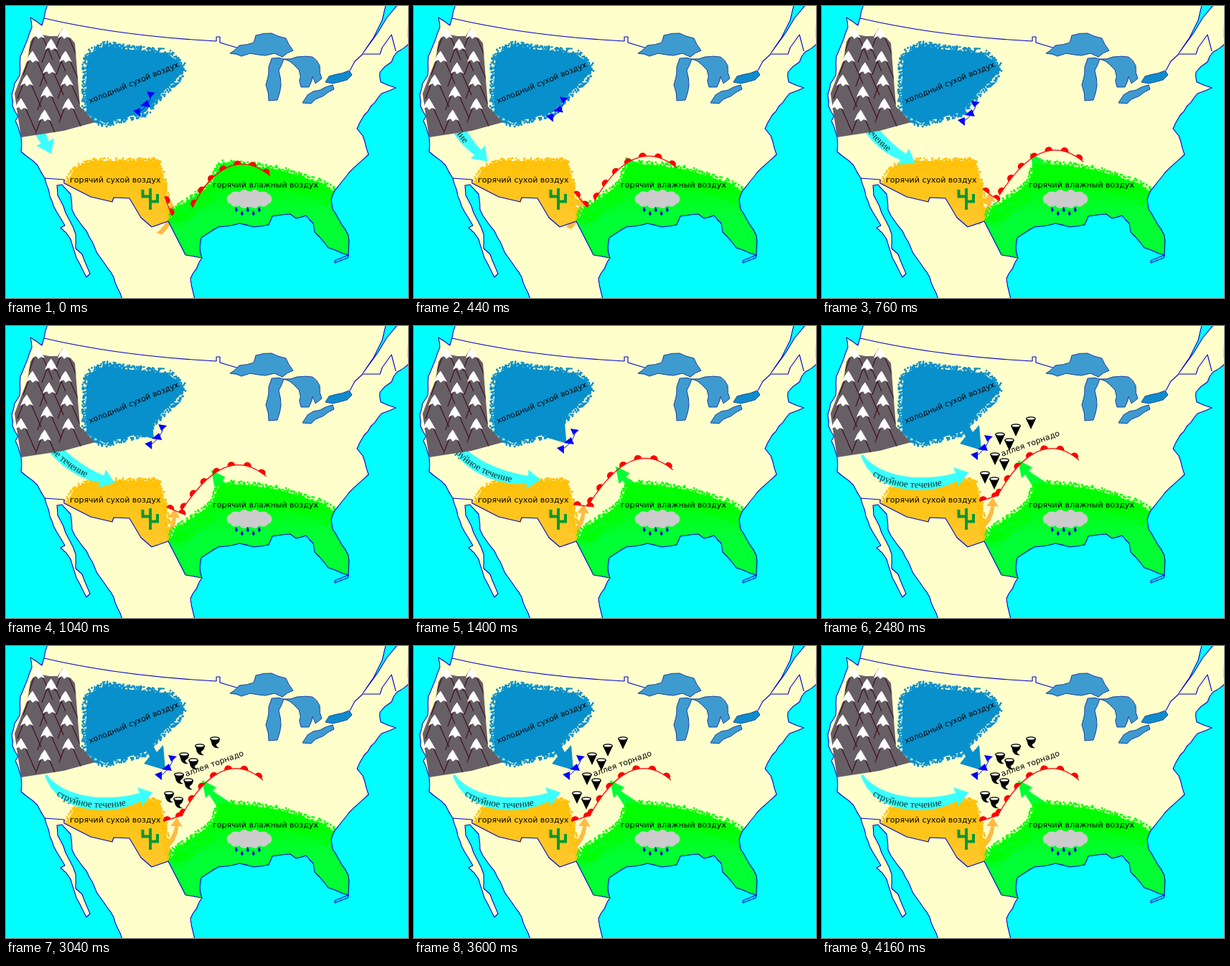
An HTML page for the animation above (4200 ms loop, 560 by 407 pixels).

```html
<!DOCTYPE html>
<html lang="ru">
<head>
<meta charset="utf-8">
<style>
html, body { margin: 0; width: 100%; height: 100%; overflow: hidden; background: #0ff; }
svg { display: block; width: 560px; height: 407px; }
text { font: 11px "DejaVu Sans", sans-serif; }
.line { fill: none; stroke: #00c; stroke-width: 1.1; stroke-linejoin: round; }
.lake { fill: #3e9bd0; stroke: #13439f; stroke-linejoin: round; }
.fuzz { fill: none; stroke-linecap: round; stroke-width: 2.8; }
</style>
</head>
<body>
<svg viewBox="0 0 560 407">
  <defs>
    <path id="flow" d="M70 208C95 225 135 231 176 220"/>
    <path id="coast"/>
    <path id="rock" d="M21 183L80 174 124 162 103 140 96 52 79 31 72 42 60 42 41 38 34 50 30 75 12 122Z"/>
    <clipPath id="onLand"><use href="#coast"/></clipPath>
    <clipPath id="onRock"><use href="#rock"/></clipPath>
    <linearGradient id="wet" gradientUnits="userSpaceOnUse" x1="350" y1="240" x2="350" y2="290">
      <stop stop-color="#0f0"/><stop offset="1" stop-color="#0f3"/>
    </linearGradient>
    <linearGradient id="dry" x2="0" y2="1">
      <stop stop-color="#ffc20a"/><stop offset="1" stop-color="#ffc82e"/>
    </linearGradient>
  </defs>

  <use href="#coast" fill="#ffc"/>
  <path class="line" style="fill:#0ff" d="M497 66L512 44 524 20 529 -1H545L530 17 518 37Z"/>
  <path class="line" d="M53 17Q160 42 293 49V43H298V51L328 60M479 90L486 77 497 67H521L524 58 537 40 543 63M477 347L458 355V358L476 351Z"/>
  <g id="lakes"></g>

  <g clip-path="url(#onLand)">
    <path id="coldArrow" fill="#0890cc" d="M185 127L195 121 210 148 219 138 222 173 192 164 200 154Z"/>
    <path id="wetArrow" fill="#0f3" d="M273 187L293 197 288 202 312 218 318 232 299 232 283 207 278 212Z"/>
    <path id="dryArrow" fill="#fb4" d="M238 239L246 252 240 251Q240 269 224 284L217 281Q233 268 235 251L229 251Z"/>
    <g id="air"></g>
  </g>
  <use href="#coast" class="line"/>
  <path id="border" class="line"/>

  <g id="jet">
    <path fill="#3cffff" d="M57 179C70 199 105 212 140 211Q164 211 186 205L183 197 204 204 190 223 188 216C170 226 145 231 120 228 85 224 64 207 54 181Z"/>
    <text style="font:13.5px 'Liberation Serif',serif" fill="#033"><textPath href="#flow">струйное течение</textPath></text>
  </g>

  <use href="#rock" fill="#665f66"/>
  <path id="ridges" clip-path="url(#onRock)" fill="none" stroke="#400c14" stroke-width="1.1"/>
  <path id="snow" fill="#fff"/>

  <path fill="none" stroke="#093" stroke-width="4" d="M190.500 256V265.500H201V254 284M211 262V272.500H201"/>
  <g id="cloud" fill="#ccc"></g>
  <path id="drops" fill="#00c"/>

  <text x="89" y="246">горячий сухой воздух</text>
  <text x="288" y="253">горячий влажный воздух</text>
  <text style="font-size:10.800px" transform="translate(117 136) rotate(-22.500)">холодный сухой воздух</text>

  <g id="coldFront">
    <path fill="none" stroke="#00f" d="M211 182Q229 176 234 153"/>
    <path fill="#00f" d="M207 179L217 175V187ZM217 172L227 164 231 174ZM226 152L238 154 230 161Z"/>
  </g>
  <g fill="none" stroke="#f00" stroke-width="1.2">
    <path id="dryFront"/>
    <path id="wetFront"/>
  </g>
  <path id="domes" fill="#f00"/>
  <g id="storms"></g>
  <text id="alley" transform="translate(251 182) rotate(-20)">аллея торнадо</text>
</svg>
<script>
const LOOP = 4200, STEP = 40, MOVE = 1920;
const $ = id => document.getElementById(id);
const put = (id, name, value) => $(id).setAttribute(name, value);
const clamp = v => Math.max(0, Math.min(1, v));
const mix = (a, b, p) => a + (b - a) * p;
const range = n => [...Array(n).keys()];
const points = s => s.split(" ").map(p => p.split(",").map(Number));
const outline = pts => "M" + pts.join("L");

let seed = 7;
function rand() {
  seed = (seed * 16807) % 2147483647;
  return seed / 2147483647;
}

// Break straight runs into short, slightly uneven pieces.
function rough(pts, amp) {
  return pts.flatMap(([x, y], i) => {
    const [u, v] = pts[(i + 1) % pts.length];
    const n = Math.max(1, Math.round(Math.hypot(u - x, v - y) / 9));
    const wobble = k => k ? (rand() - .5) * 2 * amp : 0;
    return range(n).map(k => [mix(x, u, k / n) + wobble(k), mix(y, v, k / n) + wobble(k)]);
  });
}

const west = points("58,-2 53,17 50,27 34,16 36,30 20,70 19,97 12,108 8,124 9,139 17,154 13,160 21,182 21,203 44,222 54,240");
const baja = points("61,265 70,286 82,306 76,309 90,325 98,351 112,378 117,373 106,346 97,338 97,318 72,264 71,250 78,249 90,262 92,284 116,322 131,350 150,378 162,409");
const gulf = points("263,409 257,380 273,351 270,335 272,323 296,308 325,303 345,308 366,305 371,293 396,290 404,296 418,292 428,303 430,315 449,337 477,347 477,320 455,283 453,270 458,257");
const east = points("478,232 505,207 497,181 489,171 499,152 508,140 523,122 543,114 522,106 521,92 537,78 545,64 561,53 561,-2");
put("coast", "d", outline(rough([...west, ...baja, ...gulf, ...east], 1)) + "Z");

const border = points("54,240 81,242 81,247 118,266 148,273 150,267 172,268 188,295 203,308 226,300 250,347 273,351");
put("border", "d", outline(border));

$("lakes").innerHTML = [
  "312,66 325,55 345,51 348,41 370,38 390,45 400,62 385,71 374,66 361,69 340,66 328,70",
  "370,73 387,74 380,90 383,111 378,131 366,132 362,110 366,85",
  "387,74 405,71 427,71 437,83 440,101 431,108 427,98 422,113 411,113 408,89 400,81",
  "413,135 420,124 455,110 457,116 441,126 425,136",
  "445,106 450,98 478,90 482,96 475,103 455,108"
].map(s => `<path class="lake" d="${outline(rough(points(s), 1.5))}Z"/>`).join("");
$("lakes").lastChild.style.fill = "#108ccc";

// A filled area whose edge is frayed by dots, from "inn" inside to "out" outside.
function region(edge, rest, fill, dots, out, inn, density) {
  let d = "";
  edge.slice(1).forEach(([bx, by], i) => {
    const [ax, ay] = edge[i], len = Math.hypot(bx - ax, by - ay);
    const nx = (by - ay) / len, ny = (ax - bx) / len;
    for (let k = 0; k < len * density; k++) {
      const u = rand(), off = mix(-inn, out, rand());
      d += `M${(mix(ax, bx, u) + nx * off).toFixed(1)} ${(mix(ay, by, u) + ny * off).toFixed(1)}h.01`;
    }
  });
  return `<path fill="${fill}" d="${outline([...edge, ...rest])}Z"/>
    <path class="fuzz" stroke="${dots}" d="${d}"/>`;
}
const dryEdge = points("83,246 100,223 120,216 213,216 222,255 229,300");
const wetEdge = points("229,301 234,285 285,250 299,220 330,221 380,228 440,247 458,259");
const coldEdge = points("116,66 140,55 165,60 225,66 246,84 241,98 212,126 194,148 137,163 112,150 112,84 116,66");
$("air").innerHTML =
  region(dryEdge, border.slice(2, 10).reverse(), "url(#dry)", "#ffc20a", 4, 4, 1.5) +
  region(wetEdge, [[490, 257], [490, 360], [275, 356], ...border.slice(9).reverse()],
    "url(#wet)", "#0f0", 5, 22, 4) +
  region(coldEdge, [], "#0890cc", "#0890cc", 6, 3, 1.8);

// Staggered peaks in three columns that spread towards the foot.
const peaks = range(12).map(i => {
  const row = Math.floor(i / 3), col = i % 3 - 1;
  return [63 - 3 * row + col * (18 + 5 * row), 29 + 33 * row + (col ? 0 : 16)];
});
put("snow", "d", peaks.map(([x, y]) => `M${x} ${y}l4 7 5 9-5-2-4 3-3-4-6 3 4-9z`).join(""));
put("ridges", "d", peaks.map(([x, y]) => `M${x} ${y}l-13 34M${x} ${y}l20 46`).join(""));

$("cloud").innerHTML = '<ellipse cx="339" cy="269" rx="28" ry="11"/>' + range(10).map(i => {
  const a = i * Math.PI / 5;
  return `<circle cx="${339 + 24 * Math.cos(a)}" cy="${269 + 6 * Math.sin(a)}" r="7.300"/>`;
}).join("");
put("drops", "d", range(5).map(i =>
  `M${320 + 8 * i} ${i % 2 ? 285 : 280}q4 4 2 6.500q-3 1-3-2z`).join(""));

const pairs = points("248,154 241,182 227,208").flatMap(([x, y]) => [[x, y], [x + 13, y + 8]]);
const swirl = "M-7-3C-4 3-5 5-3 7Q0 11 6 10Q1 8 2 5Q7 2 7-3Z";
const cone = "M-7-3H7L0 12Z";
$("storms").innerHTML = [...pairs, [270, 142], [291, 132]].map(([x, y]) =>
  `<g transform="translate(${x} ${y})"><path class="funnel"/>
  <ellipse cy="-3" rx="6" ry="2.200" fill="#fff" stroke="#000" stroke-width="1.300"/></g>`).join("");
const funnels = [...document.querySelectorAll(".funnel")];

function dome({ x, y }, angle) {
  const dx = 5.5 * Math.cos(angle), dy = 5.5 * Math.sin(angle);
  return `M${x - dx} ${y - dy}A5.500 5.500 0 0 1 ${x + dx} ${y + dy}Z`;
}

function domesAlong(id, shares) {
  const path = $(id), len = path.getTotalLength();
  return shares.map(s => {
    const a = path.getPointAtLength(s * len - 3), b = path.getPointAtLength(s * len + 3);
    return dome(path.getPointAtLength(s * len), Math.atan2(b.y - a.y, b.x - a.x));
  }).join("");
}

const wetFrom = points("260,281 278,240 319,196 368,237");
const wetTo = points("244,238 270,190 310,146 358,187");

function drawFronts(p) {
  const bow = 7 * Math.sin(Math.PI * p);
  const [a, b, c, d] = wetFrom.map((q, i) => q.map((v, k) => mix(v, wetTo[i][k], p)));
  a[0] -= bow;
  put("wetFront", "d", `M${a}C${b} ${c} ${d}`);

  const turn = mix(70, -18, p) * Math.PI / 180;
  const x = mix(226, 233, p) + bow, y = mix(279, 240, p);
  const along = s => [x + s * Math.cos(turn), y + s * Math.sin(turn)];
  put("dryFront", "d", `M${along(-14)}L${along(14)}`);
  put("domes", "d", domesAlong("dryFront", [.18, .82]) +
    domesAlong("wetFront", range(7).map(i => .045 + .15 * i)));
}

function drawStorms(t) {
  put("storms", "opacity", clamp((t - 1640) / 400));
  put("alley", "opacity", clamp((t - 1840) / 360));
  const phase = t / STEP % 4;
  funnels.forEach(f => {
    f.setAttribute("d", phase === 2 ? cone : swirl);
    f.setAttribute("transform", `scale(${[1, .8, 1, -1][phase]} 1)`);
  });
}

function draw(t) {
  const p = clamp(t / MOVE), left = 1 - p;
  const shift = (id, x, y) => put(id, "transform", `translate(${x * left} ${y * left})`);
  shift("coldFront", -30, -33);
  shift("coldArrow", -35, -34);
  shift("wetArrow", 28, 30);
  shift("dryArrow", -7, 35);
  put("jet", "transform",
    `translate(${mix(64.6, 130, p)} ${mix(131, 192, p)}) rotate(${82 * left}) translate(-130 -192)`);
  drawFronts(p);
  drawStorms(t);
}

const start = performance.now();
function tick() {
  const t = (performance.now() - start) % LOOP;
  draw(Math.floor(t / STEP) * STEP);
  requestAnimationFrame(tick);
}
tick();
</script>
</body>
</html>
```
